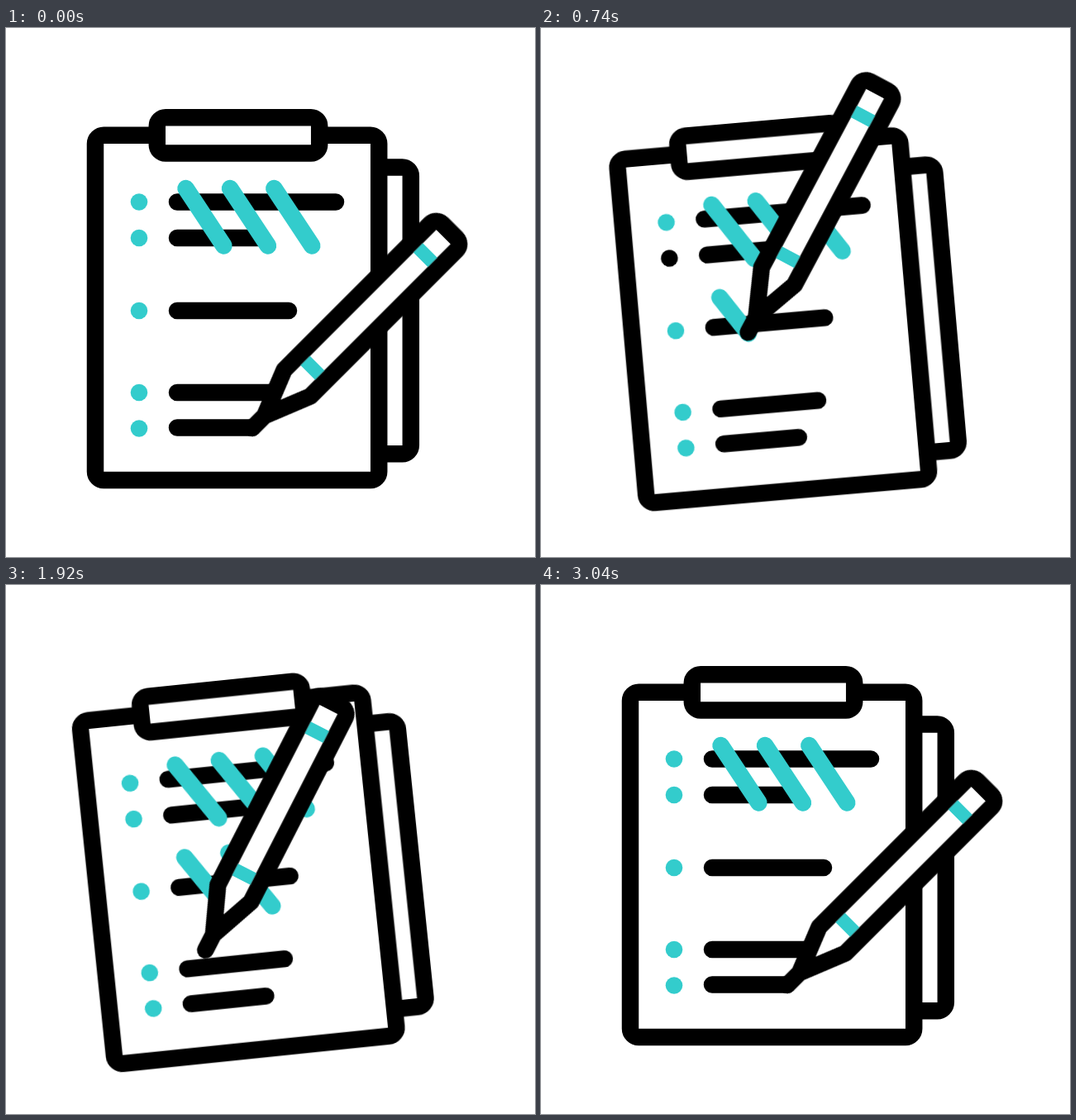
Write an HTML page without scripts that moves like this. It is 640 by 640 pixels and loops after 3100 ms.

```html
<!DOCTYPE html>
<html lang="en">
<head>
<meta charset="utf-8">
<title>Checklist</title>
<style>
  html, body { margin: 0; width: 100%; height: 100%; overflow: hidden; background: #fff; }
  svg { display: block; width: 100%; height: 100%; }

  .ink, .mark { stroke-width: 20.5; stroke-linecap: round; stroke-linejoin: round; }
  .ink { stroke: #000; fill: #fff; }
  .mark { stroke: #3cc; fill: none; }
  .dots, .band { fill: #3cc; }

  .board, .pencil, .dots circle, .draw {
    animation: 3100ms linear infinite;
  }

  .board { transform-origin: 440px 331px; animation-name: tilt; }
  @keyframes tilt {
    0% { transform: rotate(0deg); animation-timing-function: ease; }
    45%, 61.5% { transform: rotate(-6deg); animation-timing-function: cubic-bezier(.3, .3, .7, .85); }
    91%, 100% { transform: rotate(0deg); }
  }

  /* The origin of the pencil is its tip */
  .pencil { animation-name: write; animation-timing-function: cubic-bezier(.3, .2, .7, .8); }
  @keyframes write {
    0% {
      transform: translate(298px, 484px) rotate(45deg);
      animation-timing-function: cubic-bezier(.4, 0, .5, 1);
    }
    17.42% { transform: translate(217px, 302.5px) rotate(33deg); }
    27.42% { transform: translate(263.5px, 376px) rotate(33deg); }
    38.39% { transform: translate(271px, 306.5px) rotate(33deg); }
    50.97% { transform: translate(317px, 376px) rotate(33deg); }
    63.23% { transform: translate(223.5px, 424.5px) rotate(33deg); }
    75.48% { transform: translate(269.5px, 494px) rotate(33deg); }
    97.42%, 100% { transform: translate(298px, 484px) rotate(45deg); }
  }

  .draw { stroke-dasharray: 1 2; animation-timing-function: cubic-bezier(.3, .2, .7, .8); }
  .d1 { animation-name: draw1; }
  .d2 { animation-name: draw2; }
  .d3 { animation-name: draw3; }
  @keyframes draw1 {
    0%, 17.41% { stroke-dashoffset: 1; opacity: 0; }
    17.42% { stroke-dashoffset: 1; opacity: 1; }
    27.42%, 85% { stroke-dashoffset: 0; opacity: 1; }
    94%, 100% { stroke-dashoffset: 0; opacity: 0; }
  }
  @keyframes draw2 {
    0%, 38.38% { stroke-dashoffset: 1; opacity: 0; }
    38.39% { stroke-dashoffset: 1; opacity: 1; }
    50.97%, 85% { stroke-dashoffset: 0; opacity: 1; }
    94%, 100% { stroke-dashoffset: 0; opacity: 0; }
  }
  @keyframes draw3 {
    0%, 63.22% { stroke-dashoffset: 1; opacity: 0; }
    63.23% { stroke-dashoffset: 1; opacity: 1; }
    75.48%, 85% { stroke-dashoffset: 0; opacity: 1; }
    94%, 100% { stroke-dashoffset: 0; opacity: 0; }
  }

  /* Each bullet blinks black in turn */
  .dots circle {
    animation-name: blink;
    animation-delay: calc(305ms + var(--i) * 255ms);
    animation-fill-mode: backwards;
  }
  @keyframes blink {
    0% { fill: #3cc; }
    3.4%, 8.2% { fill: #000; }
    11.6%, 100% { fill: #3cc; }
  }
</style>
</head>
<body>
<svg viewBox="0 0 640 640">
  <g class="board">
    <path class="ink" d="M451 168.5H479.5a10.3 10.3 0 0 1 10.3 10.3V505a10.3 10.3 0 0 1-10.3 10.3H451"/>
    <rect class="ink" x="108" y="129.8" width="343.2" height="417.2" rx="10.3"/>
    <rect class="ink" x="182.8" y="108.3" width="196.4" height="43.2" rx="10.3"/>

    <path class="ink" d="M207 210.5H399M207 254H307M207 342H342M207 441H325M207 483.5H298"/>

    <g class="dots">
      <circle style="--i:0" cx="161" cy="210.5" r="10.3"/>
      <circle style="--i:1" cx="161" cy="254" r="10.3"/>
      <circle style="--i:2" cx="161" cy="342" r="10.3"/>
      <circle style="--i:3" cx="161" cy="441" r="10.3"/>
      <circle style="--i:4" cx="161" cy="484.5" r="10.3"/>
    </g>

    <path class="mark" d="M217.5 194l46 69.5M271 194l46 69.5M324.3 194l46 69.5"/>
    <path class="mark draw d1" pathLength="1" d="M217.5 306.5l46 69.5"/>
    <path class="mark draw d2" pathLength="1" d="M271 306.5l46 69.5"/>
    <path class="mark draw d3" pathLength="1" d="M223.5 424.5l46 69.5"/>

    <g class="pencil">
      <path class="ink" d="M0 0V-21L-22.5-77V-327a10.3 10.3 0 0 1 10.3-10.3H12.2a10.3 10.3 0 0 1 10.3 10.3V-77L0-21"/>
      <path class="band" d="M-12.4-111h24.8v16h-24.8zM-12.4-304h24.8v16h-24.8z"/>
    </g>
  </g>
</svg>
</body>
</html>
```
